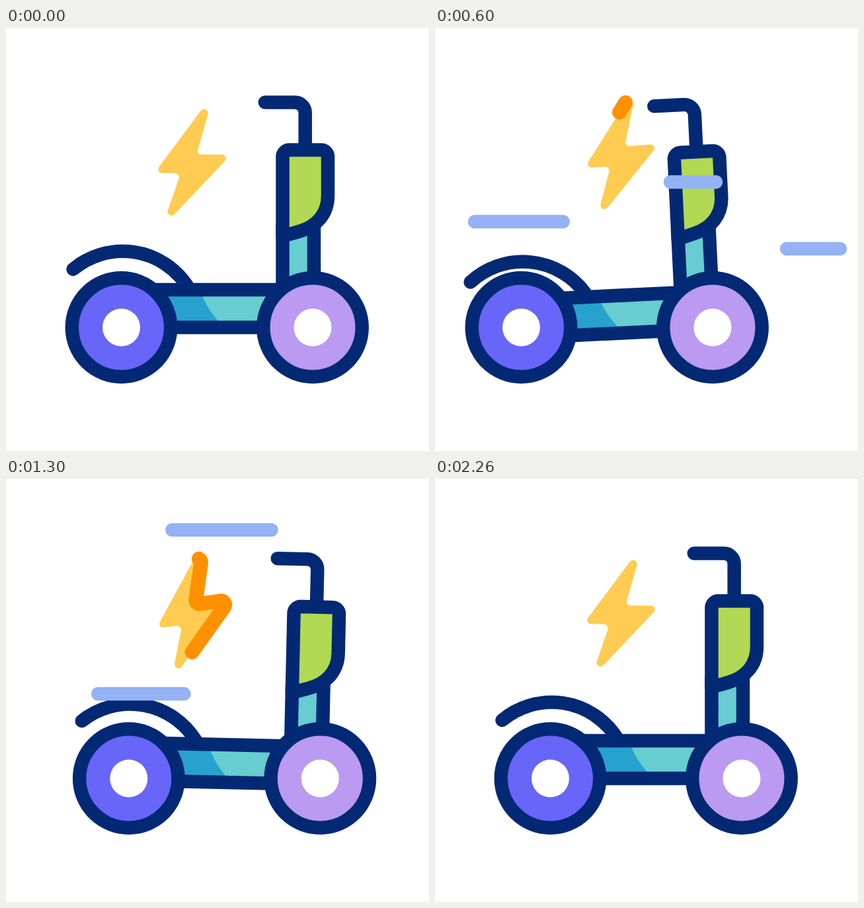
An HTML page that plays this animation: 640 px wide and 640 px high, repeating every 2400 ms.

```html
<!DOCTYPE html>
<html lang="en">
<head>
<meta charset="utf-8">
<title>Electric scooter</title>
<style>
  html, body { margin: 0; width: 100%; height: 100%; overflow: hidden; background: #fff; }
  svg { display: block; width: 100%; height: 100%; }
  .ink { fill: none; stroke: #032975; stroke-width: 20.5; stroke-linecap: round; stroke-linejoin: round; }
  #lines line { stroke: #94b2f4; stroke-width: 20.5; stroke-linecap: round; }
  #spark { fill: none; stroke: #ff9100; stroke-width: 22; stroke-linecap: round; stroke-linejoin: round; }
</style>
</head>
<body>
<svg viewBox="0 0 640 640">
  <defs>
    <path id="boltShape" pathLength="1" d="M294.5 125.5 L232 209.5 C228.5 214 231 219.5 236.5 219.5 H254.5 C260 219.5 263 223.5 261.3 228.5 L245 275.5 C243 282 250 286.5 255 281.7 L330.5 202 C335 197 332 191.5 326.5 191.5 H296.5 C291.5 191.5 289 188 290.4 183.5 L305.5 130.5 C307 123.5 299 120 294.5 125.5"/>
    <g id="wheel">
      <circle class="ink" style="fill:inherit" r="74.7"/>
      <circle r="28.5" fill="#fff"/>
    </g>
  </defs>
  <g id="scooter">
    <g id="body">
      <path fill="#67cdd0" d="M200 396 H418.5 V310 H466 V453 H200 Z"/>
      <path fill="#27a1cd" d="M200 396 H294 Q302 425 330 453 H200 Z"/>
      <path class="ink" d="M101.5 365 A117 117 0 0 1 274 390"/>
      <path class="ink" d="M210 396 H418.5 V300 M210 453 H464 M466 290 V400"/>
      <path class="ink" style="fill:#b1d953" d="M418.5 315 V194.5 A10 10 0 0 1 428.5 184.5 H477 A10 10 0 0 1 487 194.5 V254 C487 282 469 301 443 308 Z"/>
      <path class="ink" d="M391.8 112.5 H437 A15.5 15.5 0 0 1 452.7 128 V182"/>
    </g>
    <use href="#wheel" x="174.5" y="453" fill="#6865f9"/>
    <use href="#wheel" x="464" y="453" fill="#bb9af1"/>
  </g>
  <g id="bolt">
    <use href="#boltShape" fill="#ffcb51"/>
    <use href="#boltShape" id="spark"/>
  </g>
  <g id="lines"></g>
</svg>
<script>
  const LOOP = 2400, MOVE = 2260, STEP = 20;
  const TRAVEL = 200, GROW = 440, LAG = 254;
  const $ = id => document.getElementById(id);
  const scooter = $('scooter'), body = $('body'), bolt = $('bolt'), spark = $('spark');

  const ease = (t, start, span) => {
    const u = Math.min(1, Math.max(0, (t - start) / span));
    return u * u * (3 - 2 * u);
  };

  // Eases from rest through evenly spaced swings and back to rest
  const BEAT = MOVE / 7;
  const bounce = (t, ...swings) => [...swings, 0].reduce(
    (sum, v, i) => sum + (v - (swings[i - 1] ?? 0)) * ease(t, i * BEAT, BEAT), 0);

  // Back, forward, back, home
  const drive = t => -44.7 * ease(t, 0, 570) + 78.4 * ease(t, 570, 545)
    - 71.2 * ease(t, 1115, 495) + 37.5 * ease(t, 1610, 570);

  // Lean back, forward, upright
  const QUARTER = MOVE / 4;
  const lean = t => -2.8 * ease(t, 0, QUARTER) + 5.7 * ease(t, QUARTER, 2 * QUARTER)
    - 2.9 * ease(t, 3 * QUARTER, QUARTER);

  function place(el, dx, dy, angle, pivot) {
    el.setAttribute('transform', `translate(${dx} ${dy}) rotate(${angle} ${pivot})`);
  }

  const show = (el, on) => el.setAttribute('visibility', on ? 'visible' : 'hidden');

  function addLine(x, y, start) {
    const el = document.createElementNS('http://www.w3.org/2000/svg', 'line');
    el.setAttribute('y1', y);
    el.setAttribute('y2', y);
    $('lines').append(el);
    return t => {
      const front = ease(t, start, GROW), back = ease(t, start + LAG, GROW);
      show(el, front - back > 0.0005);
      el.setAttribute('x1', x - TRAVEL * back);
      el.setAttribute('x2', x - TRAVEL * front);
    };
  }

  const lines = [
    addLine(556, 233, 80), addLine(259, 293, 178), addLine(613, 334, 408),
    addLine(412, 77, 985), addLine(270, 325, 1034)
  ];

  function draw(t) {
    place(scooter, drive(t), 0, 0, '0 0');
    place(body, 0, bounce(t, 7.3, 9, -12.4, 6, -2.5), lean(t), '319 450');
    place(bolt, 0, bounce(t, 48, -15, 46, -0.4, -1.3), bounce(t, -13.3, -4, 10.6, -8, 1.7), '278.2 204.5');

    const head = ease(t, 497, 880), tail = ease(t, 845, 870);
    show(spark, head - tail > 0.0005);
    spark.style.strokeDasharray = `${head - tail} 2`;
    spark.style.strokeDashoffset = -tail;

    lines.forEach(update => update(t));
  }

  const origin = performance.now();
  function tick() {
    const t = (performance.now() - origin) % LOOP;
    draw(Math.floor(t / STEP) * STEP);
    requestAnimationFrame(tick);
  }
  draw(0);
  requestAnimationFrame(tick);
</script>
</body>
</html>
```
